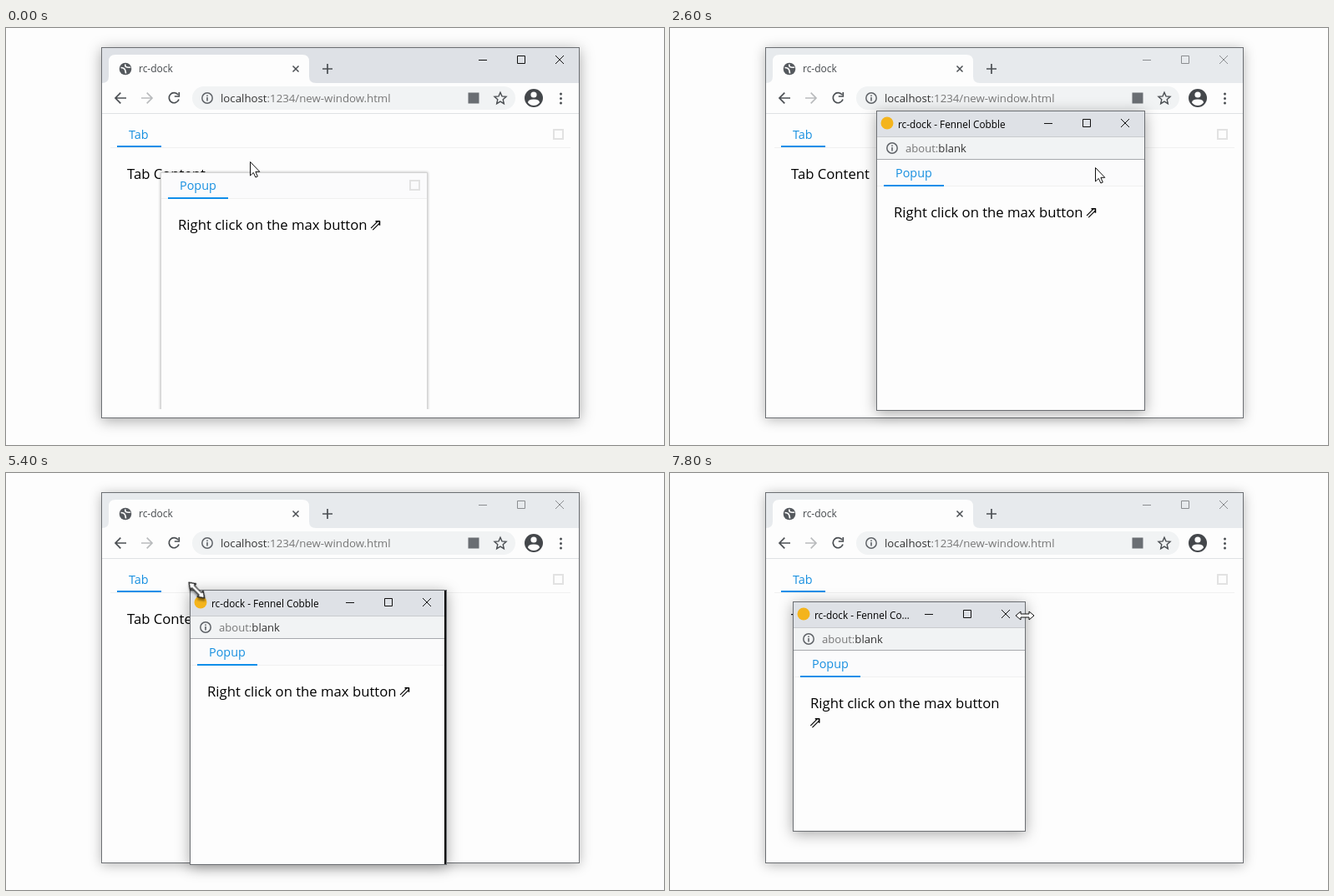
Recreate the animation shown at these times as an HTML page. Size 788 by 500 pixels, loop 8000 ms.

```html
<!DOCTYPE html>
<html lang="en">
<head>
<meta charset="utf-8">
<title>Dock popup to window</title>
<style>
html, body { margin: 0; width: 100%; height: 100%; overflow: hidden; background: #fdfdfd; }
body { position: relative; font-family: "Open Sans", "Noto Sans", sans-serif; color: #000; }
div, span.text, svg { position: absolute; box-sizing: border-box; }
.text { line-height: 20px; white-space: nowrap; }
.window { border: 1px solid #6b6e72; background: #fdfdfd; box-shadow: 0 3px 16px rgba(0,0,0,.34); }
.window.unfocused { box-shadow: 0 2px 14px rgba(0,0,0,.28); }
.controls { right: 12px; top: 7px; width: 116px; height: 14px; fill: none; stroke: #111; }
.strip { left: 0; right: 0; top: 0; background: #dee1e6; }
.unfocused .strip { background: #e7eaed; }
.unfocused .controls { stroke: #8a8c8f; }
.tab { font-size: 14.4px; color: #1890e0; }
.underline { height: 2px; background: #108ee9; }
.max { width: 13px; height: 13px; border: 2px solid #e2e2e2; }
.max.hover { border-color: #aaa; }
.body-text { font-size: 16.7px; line-height: 22.5px; }
.panel { left: 0; right: 0; }
.panel-head { left: 0; right: 0; top: 0; height: 31px; background: #fbfbfc; border-bottom: 1px solid #f0f0f0; }
.symbol { font: 19px/1 "DejaVu Sans", sans-serif; margin-left: -2px; }
.gray { color: #777; }
#clip { left: 115px; top: 103px; width: 571px; height: 354px; overflow: hidden; }
#popup { width: 320px; height: 300px; background: #fdfdfd; border: 1px solid #d4d4d4; box-shadow: 0 0 3px rgba(0,0,0,.3); }
#menu { left: 479px; top: 160px; width: 127px; height: 60px; background: #fdfdfd; border: 1px solid #d9d9d9; box-shadow: 0 0 3px rgba(0,0,0,.2); }
#edge { right: 0; top: 0; bottom: 0; width: 2px; background: #000; }
#cursor { fill: #fff; stroke: #111; stroke-linejoin: round; }
#cursor.lifted { filter: drop-shadow(2px 2px 1px rgba(0,0,0,.45)); }
</style>
</head>
<body>
<svg width="0" height="0">
  <symbol id="controls" viewBox="0 0 116 14" overflow="visible">
    <path d="M8 7.5h10M54.5 2.5h9v9h-9zM100 2l10 10m0-10l-10 10"/>
  </symbol>
  <symbol id="info" viewBox="-8 -8 16 16">
    <circle r="6.2" fill="none" stroke="#5f6368" stroke-width="1.5"/>
    <path d="M0-1v4.5M0-3.6v1.6" stroke="#5f6368" stroke-width="1.6"/>
  </symbol>
</svg>

<div class="window" id="main" style="left:114px;top:23px;width:573px;height:445px">
  <div class="strip" style="height:42px"></div>
  <svg class="controls"><use href="#controls"/></svg>
</div>
<svg width="788" height="500" fill="none" stroke="#4b4f53" stroke-width="1.7">
  <path d="M115 66q8 0 8-8V40q0-8 8-8H355q8 0 8 8V58q0 8 8 8z" fill="#fdfdfd" stroke="none"/>
  <path d="M115 102.5H686" stroke="#dfe1e4" stroke-width="1"/>
  <rect x="223" y="70" width="387" height="28" rx="14" fill="#f1f3f4" stroke="none"/>
  <circle cx="143" cy="49" r="7.3" fill="#55595e" stroke="none"/>
  <path d="M137.5 47.5q4 0 5 2.5t1 4.5M143 43.5q-1 3 2 3.5t4 0" stroke="#fdfdfd"/>
  <path d="M343.5 45.5l7 7m0-7l-7 7" stroke-width="1.5"/>
  <path d="M379 49h12M385 43v12"/>
  <path d="M144 84h-13m6.3-6.3L131 84l6.3 6.3"/>
  <path d="M162 84h13m-6.3-6.3L175 84l-6.3 6.3" stroke="#b9bbbd"/>
  <path d="M206 80a6 6 0 1 0 1 5.5M207.3 77v5h-5.5"/>
  <use href="#info" x="233" y="76" width="16" height="16" stroke="none"/>
  <rect x="553.5" y="77.5" width="13" height="13" fill="#6a6e73" stroke="none"/>
  <path d="M592 77.3l2 4.6 5 .5-3.8 3.3 1.1 5-4.3-2.6-4.3 2.6 1.1-5-3.8-3.3 5-.5z" stroke-width="1.4"/>
  <circle cx="632" cy="84" r="11" fill="#44474b" stroke="none"/>
  <path d="M625 89.5q0-4 7-4t7 4q-3 3.5-7 3.5t-7-3.5" fill="#fdfdfd" stroke="none"/>
  <circle cx="632" cy="80" r="3.6" fill="#fdfdfd" stroke="none"/>
  <path d="M664.5 79v.01M664.5 84.5v.01M664.5 90v.01" stroke-width="3" stroke-linecap="round"/>
  <path d="M125 143.5H676" stroke="#f0f0f0" stroke-width="1"/>
</svg>
<span class="text" style="left:159px;top:39px;font-size:12px;color:#45494d">rc-dock</span>
<span class="text" style="left:257px;top:74px;font-size:13.25px;color:#333">localhost<span class="gray">:1234/new-window.html</span></span>
<span class="text tab" style="left:147px;top:118px">Tab</span>
<div class="underline" style="left:133px;top:141px;width:53px"></div>
<div class="max" style="left:655px;top:121px"></div>
<span class="text body-text" style="left:145px;top:164px">Tab Content</span>

<div id="clip"><div id="popup">
  <div class="panel"></div>
  <div class="max" id="popup-max" style="right:8px;top:8px"></div>
  <svg style="right:0;bottom:0" width="10" height="10"><path d="M10 0V10H0z" fill="#dcdcdc"/></svg>
</div></div>
<div id="menu"><span class="text" style="left:16px;top:19px;font-size:14.4px">New Window</span></div>

<div class="window" id="child">
  <div class="strip" style="height:30px"></div>
  <svg style="left:4px;top:6px" width="16" height="16"><circle cx="8" cy="8" r="7.5" fill="#f4b41c"/></svg>
  <span class="text" style="left:25px;right:137px;top:5px;font-size:11.8px;overflow:hidden;text-overflow:ellipsis">rc-dock - Fennel Cobble</span>
  <svg class="controls"><use href="#controls"/></svg>
  <div style="left:0;right:0;top:30px;height:28px;background:#f1f3f4;border:solid #c9cbce;border-width:1px 0;border-bottom-color:#a6a8ac"></div>
  <svg style="left:10px;top:36px" width="16" height="16"><use href="#info"/></svg>
  <span class="text" style="left:34px;top:34px;font-size:13.1px;color:#333"><span class="gray">about:</span>blank</span>
  <div class="panel" style="top:59px"></div>
  <div id="edge"></div>
</div>

<svg width="788" height="500"><path id="cursor"/></svg>

<script>
const LOOP = 8000, STEP = 200;
const ARROW = 'M.5.5V17L4.3 13.4 6.9 19 9.3 18 6.9 12.3H11.8Z';
const RESIZER = 'M-11 0l6-5v3h10v-3l6 5-6 5v-3h-10v3z';

const el = id => document.getElementById(id);
const show = (id, visible) => { el(id).style.display = visible ? '' : 'none'; };
const mix = (a, b, k) => a.map((v, i) => v + (b[i] - v) * k);

function ease(t, from, until) {
  const k = Math.min(1, Math.max(0, (t - from) / (until - from)));
  return k * k * (3 - 2 * k);
}

for (const panel of document.querySelectorAll('.panel')) {
  panel.innerHTML = `<div class="panel-head"></div>
    <span class="text tab" style="left:22px;top:5px">Popup</span>
    <div class="underline" style="left:8px;top:29px;width:72px"></div>
    <div class="body-text" style="left:20px;right:20px;top:51px">Right click on the max button <span class="symbol">⇗</span></div>`;
}

// The dragged popup swings past its resting place and settles.
function popupPosition(t) {
  const swing = Math.exp(-t / 200) * Math.cos(t * Math.PI / 250);
  return [171 + 14 * swing, 139 + 34 * swing];
}

// Left, top, right and bottom of the child window.
function childBox(t) {
  const at = (x, y, w, h) => [x, y, x + w, y + h];
  let box = at(247, 99, 322, 360);
  box = mix(box, at(42, 105, 322, 360), ease(t, 3000, 3600));
  box = mix(box, at(207, 110, 322, 360), ease(t, 3600, 4200));
  box = mix(box, at(245, 194, 280, 276), ease(t, 5000, 6000));
  const carry = ease(t, 6200, 7000);
  const dx = 55 * Math.sin(2 * Math.PI * carry), dy = -70 * Math.sin(Math.PI * carry);
  const [x, y, right, bottom] = mix(box, at(147, 154, 279, 276), carry);
  return [x + dx, y + dy, right + dx, bottom + dy];
}

// Each move heads for a point; points on the window keep following it.
function cursorPosition(t, [x, y]) {
  let point = [292, 160];
  const go = (to, from, until) => { point = mix(point, to, ease(t, from, until)); };
  go([276, 149], 0, 400);
  go([452, 158], 400, 1000);
  go([476, 155], 1000, 1200);
  go([512, 182], 1600, 2000);
  go([509, 167], 2200, 2400);
  go([x + 150, y + 18], 2600, 3000);
  go([302, 122], 4200, 4600);
  go([x + 8, y + 1], 4600, 5000);
  go([x + 75, y + 14], 6000, 6200);
  go([425, 171], 7200, 7800);
  return point;
}

function place(id, x, y, right, bottom) {
  const style = el(id).style;
  [x, y, right, bottom] = [x, y, right, bottom].map(Math.round);
  style.left = x + 'px';
  style.top = y + 'px';
  if (right) { style.width = right - x + 'px'; style.height = bottom - y + 'px'; }
}

function drawCursor(t, [x, y]) {
  const diagonal = t >= 5000 && t <= 6000, horizontal = t >= 7800;
  const cursor = el('cursor');
  cursor.classList.toggle('lifted', t > 3000 && t <= 6000);
  cursor.setAttribute('d', diagonal || horizontal ? RESIZER : ARROW);
  cursor.setAttribute('transform', `translate(${x} ${y})` + (diagonal ? 'rotate(45) scale(1.2 1)' : ''));
}

function render(t) {
  const detached = t >= 2400;
  el('main').classList.toggle('unfocused', detached);
  el('popup-max').classList.toggle('hover', t >= 1400);
  show('popup', !detached);
  show('child', detached);
  show('menu', t >= 1600 && !detached);
  show('edge', t > 5000 && t <= 6000);
  const [px, py] = popupPosition(t);
  place('popup', px - 115, py - 103);
  const box = childBox(t);
  place('child', ...box);
  drawCursor(t, cursorPosition(t, box));
}

const start = performance.now();
function frame() {
  const t = (performance.now() - start) % LOOP;
  render(Math.floor(t / STEP) * STEP);
  requestAnimationFrame(frame);
}
frame();
</script>
</body>
</html>
```
